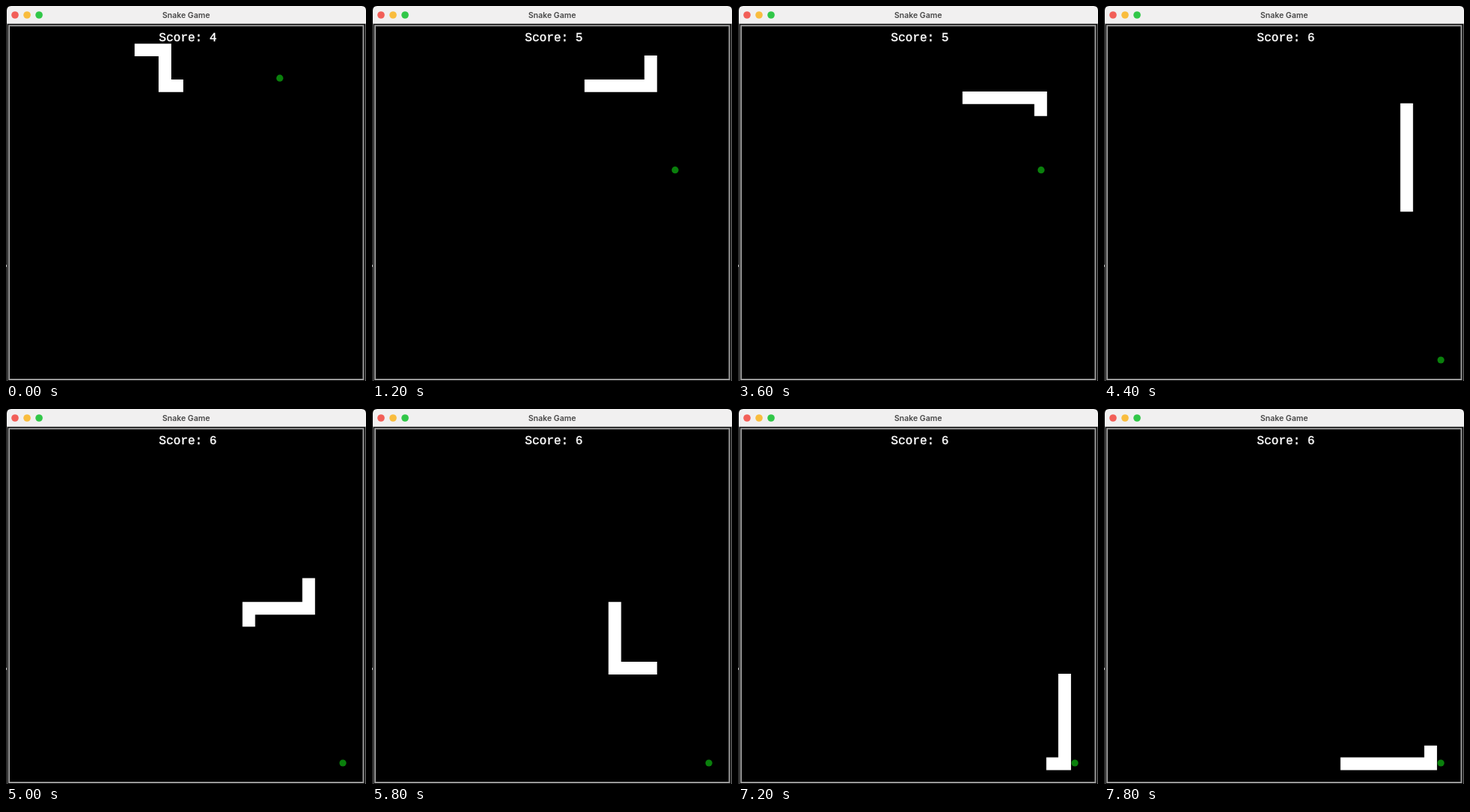
Animation of 479 by 500 pixels, one loop 8000 ms. Source, as an HTML page:

```html
<!DOCTYPE html>
<html lang="en">
<head>
<meta charset="utf-8">
<title>Snake Game</title>
<style>
  html, body { margin: 0; width: 100%; height: 100%; overflow: hidden; background: #000; }
  svg { display: block; width: 100vw; height: 100vh; }
  .title { font: 600 10.5px Inter, sans-serif; fill: #484848; }
  .score { font: 16px "Liberation Mono", monospace; fill: #fff; stroke: #fff; stroke-width: .4; white-space: pre; }
</style>
</head>
<body>
<svg viewBox="0 0 479 500">
  <rect width="479" height="500"/>
  <path d="M1.5 24V500M478.5 24V500" stroke="#777"/>
  <rect y="345" width="1" height="3" fill="#999"/>
  <path d="M1 23.7V6Q1 0 7 0H473Q479 0 479 6V23.7Z" fill="#f1f0f0"/>
  <circle cx="12" cy="12" r="4.8" fill="#f25f58"/>
  <circle cx="28" cy="12" r="4.8" fill="#f9bd3e"/>
  <circle cx="44" cy="12" r="4.8" fill="#31c748"/>
  <text class="title" x="239.7" y="15.6" text-anchor="middle">Snake Game</text>
  <rect x="4" y="26.2" width="471.5" height="471.8" fill="none" stroke="#999" stroke-width="2"/>
  <text class="score" id="score" x="203.6" y="47"></text>
  <circle id="food" r="4.6" fill="#0a800c"/>
  <path id="snake" fill="none" stroke="#fff" stroke-width="16.9" stroke-linecap="square" stroke-linejoin="miter"/>
</svg>
<script>
const LOOP = 8000, TICK = 200, PITCH = 15.94, START_LENGTH = 7;
const $ = id => document.getElementById(id);

// Grid corners of the snake's route
const corners = [[0, 0], [2, 0], [2, 3], [12, 3], [12, 1], [4, 1], [4, 4], [14, 4],
  [14, 13], [9, 13], [9, 18], [16, 18], [16, 26], [9, 26]];

// Food position and the move on which it is eaten
const foods = [
  { x: 364.3, y: 96.2, eaten: 10 },
  { x: 403.3, y: 218.7, eaten: 38 },
  { x: 448.2, y: 472, eaten: Infinity }
];

const route = [corners[0]];
for (const [cx, cy] of corners.slice(1)) {
  let [x, y] = route[route.length - 1];
  while (x !== cx || y !== cy) {
    x += Math.sign(cx - x);
    y += Math.sign(cy - y);
    route.push([x, y]);
  }
}

const toPoint = ([c, r]) =>
  `${(179.6 + c * PITCH).toFixed(2)} ${(58.6 + r * PITCH).toFixed(2)}`;

// Two moves per tick, with one lost now and then
const movesAt = tick => 2 * tick - Math.floor((tick + 4.5) / 7.5);

function draw(time) {
  const moves = movesAt(Math.floor(time % LOOP / TICK));
  const eaten = foods.filter(f => moves > f.eaten).length;
  const end = moves + START_LENGTH;
  const body = route.slice(end - START_LENGTH - eaten, end);
  $("snake").setAttribute("d", "M" + body.map(toPoint).join("L"));
  $("food").setAttribute("cx", foods[eaten].x);
  $("food").setAttribute("cy", foods[eaten].y);
  $("score").textContent = `Score: ${4 + eaten}`;
}

const begin = performance.now();
function frame() {
  draw(performance.now() - begin);
  requestAnimationFrame(frame);
}
frame();
</script>
</body>
</html>
```
